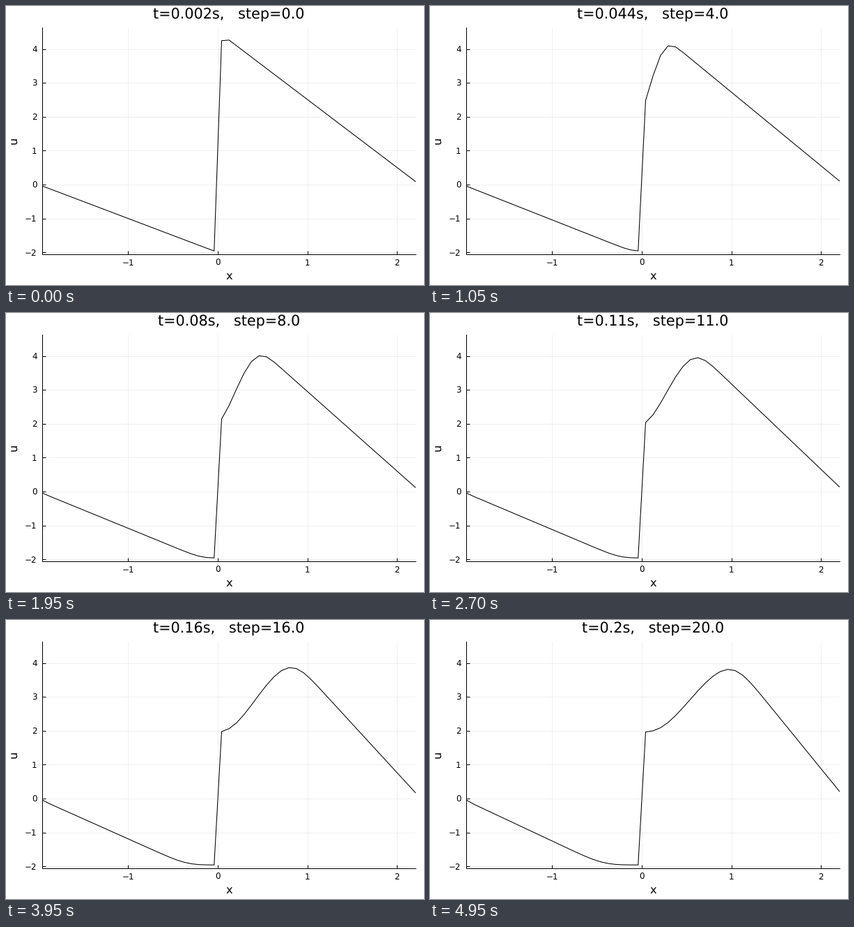
Recreate the animation shown at these times as a matplotlib script. Size 600 px wide and 400 px high, loop 5 s.

```python
import numpy as np
import matplotlib.pyplot as plt
from matplotlib.animation import FuncAnimation

W, H, DPI = 600, 400, 100
LEFT, RIGHT, TOP, BOTTOM = 52.2, 588.2, 30.8, 355.9
FRAMES, INTERVAL, PER_STEP = 100, 50, 5
CFL = 0.475

plt.rcParams["font.family"] = "DejaVu Sans"
plt.rcParams["text.hinting"] = "none"


def px(size):
    """Pixels to points."""
    return size * 72 / DPI


def initial_state():
    edges = np.linspace(-2, 2.25, 52)
    x = (edges[:-1] + edges[1:]) / 2
    return x, np.where(x < 0, -(x + 2), 2 * (2.25 - x))


def advance(u):
    """One Roe upwind step of Burgers' equation, no entropy fix."""
    left, right = u, np.append(u[1:], u[-1])
    flux = np.where(left + right >= 0, left**2, right**2) / 2
    new = u.copy()
    new[1:] -= CFL / np.abs(u).max() * np.diff(flux)
    return new


x, u0 = initial_state()
states = [u0]
for _ in range(FRAMES // PER_STEP + 1):
    states.append(advance(states[-1]))

fig = plt.figure(figsize=(W / DPI, H / DPI), dpi=DPI, facecolor="white")
ax = fig.add_axes([LEFT / W, 1 - BOTTOM / H,
                   (RIGHT - LEFT) / W, (BOTTOM - TOP) / H])
ax.set_xlim(x[0], x[-1])
ax.set_ylim(1.05 * u0.min(), 1.05 * u0.max())
ax.set_xticks(range(-1, 3))
ax.set_yticks(range(-2, 5))
ax.set_axisbelow(True)
ax.grid(color="black", alpha=0.055, linewidth=px(1))
for side in ("top", "right"):
    ax.spines[side].set_visible(False)
for side in ("left", "bottom"):
    ax.spines[side].set_linewidth(px(1))
ax.tick_params(direction="in", length=px(5), width=px(1), labelsize=px(11.9))
ax.tick_params(axis="x", pad=px(6.5))
ax.tick_params(axis="y", pad=px(7.5))


def label(px_x, px_y, text, size, rotation=0):
    return fig.text(px_x / W, 1 - px_y / H, text, fontsize=px(size),
                    ha="center", va="baseline",
                    rotation=rotation, rotation_mode="anchor")


mid_x, mid_y = (LEFT + RIGHT) / 2, (TOP + BOTTOM) / 2
label(mid_x, 391.5, "x", 16.3)
label(16, mid_y, "u", 16.3, rotation=90)
title = label(mid_x, 18, "", 20.8)
line, = ax.plot(x, u0, color="black", linewidth=px(1.05))


def draw(frame):
    n, part = divmod(frame + 1, PER_STEP)
    w = part / PER_STEP
    line.set_ydata((1 - w) * states[n] + w * states[n + 1])
    t = round((frame + 1) * 0.002, 3)
    title.set_text(f"t={t}s,   step={float(n)}")
    return line, title


anim = FuncAnimation(fig, draw, frames=FRAMES, interval=INTERVAL,
                     repeat=True, repeat_delay=0)
plt.show()
```
